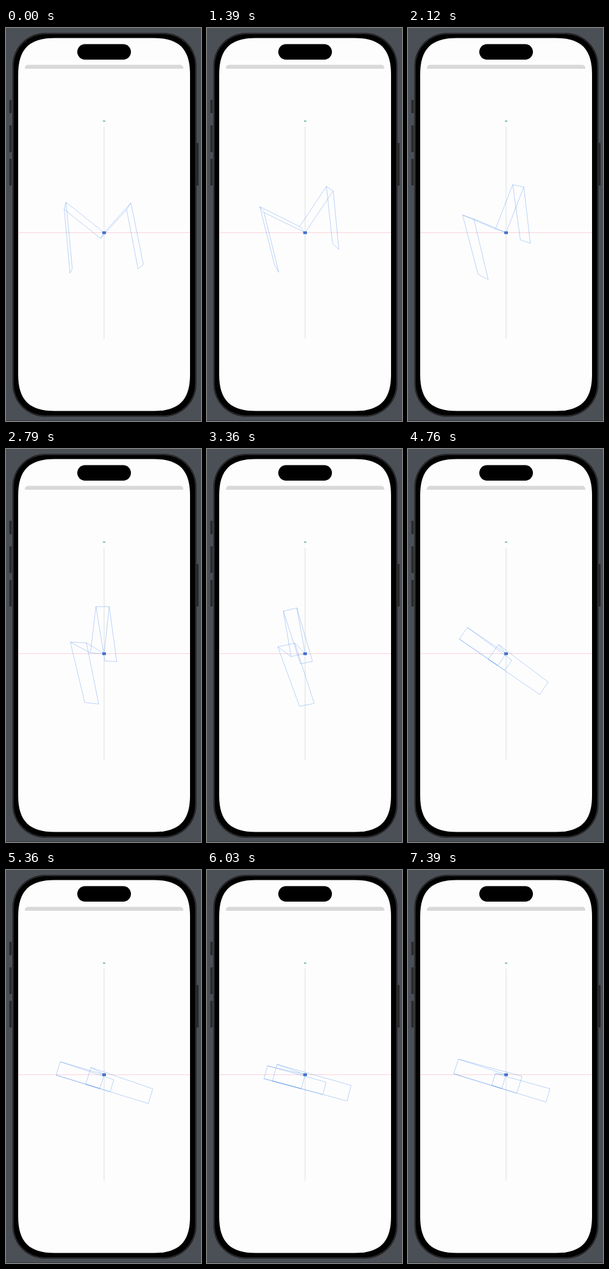
These frames come from a looping animation (320x646 px, 7420 ms). An HTML page:

```html
<!DOCTYPE html>
<html lang="en">
<head>
<meta charset="utf-8">
<title>Folded strip turning in space</title>
<style>
  html, body { margin: 0; width: 100%; height: 100%; overflow: hidden; background: #4b4f56; }
  svg { display: block; width: 100vw; height: 100vh; }
</style>
</head>
<body>
<svg viewBox="0 0 320 646">
  <rect width="320" height="646" fill="#4b4f56"/>
  <rect y="645" width="320" height="1" fill="#33363b"/>
  <g fill="#29292b">
    <rect x="5.5" y="118" width="3.8" height="22" rx="1"/>
    <rect x="5.5" y="160" width="3.8" height="44" rx="1"/>
    <rect x="5.5" y="215" width="3.8" height="44" rx="1"/>
    <rect x="312.5" y="189" width="3.5" height="70" rx="1"/>
  </g>
  <rect x="10.5" y="8" width="302" height="631" rx="54" fill="#1c1c1e"/>
  <rect x="12" y="9.5" width="299" height="628" rx="52.5" stroke="#39393c"/>
  <path d="M80 16.5h162c42 0 60 18 60 60v493c0 42-18 60-60 60H80c-42 0-60-18-60-60V76.5c0-42 18-60 60-60z" fill="#fefdfe"/>
  <path d="M31 67V66Q31 60.5 37 60.5H285Q291 60.5 291 66V67Z" fill="#d9d9d9"/>
  <rect x="117" y="26.5" width="88" height="25.5" rx="12.75"/>
  <path d="M20 336.5H302" stroke="#f6d3d6"/>
  <path d="M161 162V511" stroke="#d9e0dd"/>
  <rect x="159" y="152.4" width="4" height="1.3" fill="#35a07c"/>
  <g id="strip" stroke="#4a8fe6" stroke-opacity=".52" stroke-width=".75"></g>
  <rect x="158" y="334.3" width="6" height="4.4" fill="#4470cd"/>
</svg>
<script>
const LOOP = 7420, EYE = 450, WIDTH = 24, CX = 161, CY = 336.3;
const FOLDS = [[-58, 58], [-58, -57], [0, 0], [58, -57], [58, 58]];

// time, then z-x-z Euler angles in degrees
const POSES = [
  [0, 30.8, 29.2, -35.6],
  [1390, 138, 35.7, -152.6],
  [2790, 93, 71.9, -125],
  [3940, 63.3, 93, -123],
  [4760, 34.7, 93, -123.5],
  [5250, 17.5, 93, -123],
  [6030, 15, 93, -104],
  [7390, 17.1, 93, -60]
].map(([t, ...angles]) => ({ t, q: quaternion(...angles) }));

function quaternion(...degrees) {
  const [a, b, c] = degrees.map(d => d * Math.PI / 360);
  return [
    Math.cos(b) * Math.cos(a + c), Math.sin(b) * Math.cos(a - c),
    Math.sin(b) * Math.sin(a - c), Math.cos(b) * Math.sin(a + c)
  ];
}

function slerp(p, q, k) {
  const dot = p.reduce((sum, v, i) => sum + v * q[i], 0);
  const sign = dot < 0 ? -1 : 1;
  const angle = Math.acos(Math.min(1, dot * sign));
  if (angle < 1e-5) return p;
  const s = Math.sin(angle);
  const f = Math.sin((1 - k) * angle) / s, g = sign * Math.sin(k * angle) / s;
  return p.map((v, i) => f * v + g * q[i]);
}

function poseAt(t) {
  let i = 0;
  while (i < POSES.length - 2 && t > POSES[i + 1].t) i++;
  const from = POSES[i], to = POSES[i + 1];
  return slerp(from.q, to.q, Math.min(1, (t - from.t) / (to.t - from.t)));
}

function project([w, x, y, z], a, b, c) {
  // twice the cross product of the vector part with the point
  const tx = 2 * (y * c - z * b), ty = 2 * (z * a - x * c), tz = 2 * (x * b - y * a);
  const px = a + w * tx + y * tz - z * ty;
  const py = b + w * ty + z * tx - x * tz;
  const pz = c + w * tz + x * ty - y * tx;
  const scale = EYE / (EYE - pz);
  return (CX + px * scale).toFixed(2) + " " + (CY + py * scale).toFixed(2);
}

// one path per edge, so that edges darken where they overlap
const strip = document.getElementById("strip");
const edges = Array.from({ length: 3 * FOLDS.length - 2 }, () =>
  strip.appendChild(document.createElementNS("http://www.w3.org/2000/svg", "path")));

function draw(now) {
  const q = poseAt(now % LOOP);
  const near = FOLDS.map(([a, b]) => project(q, a, b, 0));
  const far = FOLDS.map(([a, b]) => project(q, a, b, -WIDTH));
  const along = side => side.slice(1).map((p, i) => [side[i], p]);
  const pairs = [...along(near), ...along(far), ...near.map((p, i) => [p, far[i]])];
  pairs.forEach(([p, r], i) => edges[i].setAttribute("d", "M" + p + "L" + r));
  requestAnimationFrame(draw);
}
draw(0);
</script>
</body>
</html>
```
